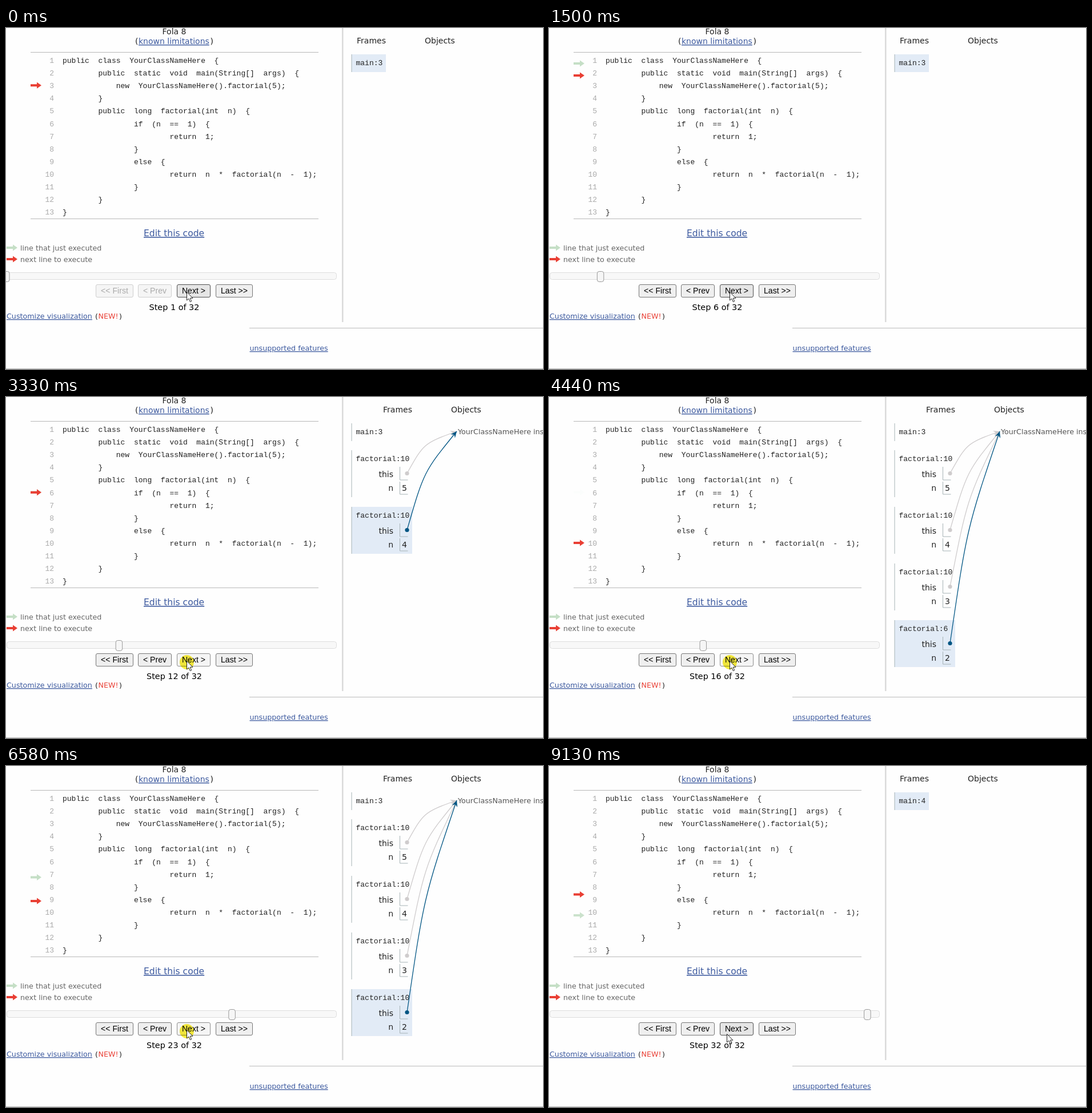
Animation of 940x596 px, one loop 9.2 s. Source, as an HTML page:

```html
<!DOCTYPE html>
<html lang="en">
<head>
<meta charset="utf-8">
<title>Stepping through a recursive factorial</title>
<style>
html, body { margin: 0; width: 100%; height: 100%; overflow: hidden; background: #fefefe; }
svg { display: block; }
text { font: 14px "DejaVu Sans", sans-serif; fill: #222; white-space: pre; }
.mono { font: 13.03px "Liberation Mono", monospace; }
.small { font-size: 12.7px; }
.link { fill: #3d5a9f; text-decoration: underline; }
.button { font: 14.1px "Liberation Sans", sans-serif; }
</style>
</head>
<body>
<svg width="940" height="596" viewBox="0 0 940 596"><g id="page"></g><g id="live"></g></svg>
<script>
const LOOP = 9200;
const RED = '#e93f34', GREEN = '#c5dfc6', BLUE = '#005583', GREY = '#cfcccd', EDGE = '#a6b3b6';
const CODE = `public class YourClassNameHere {
    public static void main(String[] args) {
      new YourClassNameHere().factorial(5);
    }
    public long factorial(int n) {
        if (n == 1) {
            return 1;
        }
        else {
            return n * factorial(n - 1);
        }
    }
}`.replace(/ /g, '  ').split('\n');

// Time of every click, and the line of code that runs next after it
const clicks = [0, 180, 460, 700, 940, 1172, 1660, 1950, 2240, 2530, 2820, 3110, 3410, 3690, 3970, 4250,
  4515, 4790, 5050, 5300, 5700, 5960, 6238, 6640, 6950, 7290, 7640, 7930, 8230, 8530, 8835, 9110];
const call = [6, 6, 10];
const lines = [3, 3, 1, 1, 1, 3, ...call, ...call, ...call, ...call, 6, 6, 7, 7, ...Array(8).fill(10), 3, 4];

const clamp = v => Math.max(0, Math.min(1, v));
const ease = v => v < .5 ? 4 * v ** 3 : 1 - 4 * (1 - v) ** 3;
const esc = s => String(s).replace(/</g, '&lt;').replace(/>/g, '&gt;');
const text = (x, y, s, cls = '', more = '') => `<text x="${x}" y="${y}" class="${cls}" ${more}>${esc(s)}</text>`;
const rect = (x, y, w, h, fill, more = '') => `<rect x="${x}" y="${y}" width="${w}" height="${h}" fill="${fill}" ${more}/>`;
const path = (d, more) => `<path d="${d}" ${more}/>`;
const END = 'text-anchor="end"', MID = 'text-anchor="middle"';
const marker = (x, y, fill) =>
  path(`M${x},${y - 2}h11v-3.5l8,5.5l-8,5.5v-3.5h-11z`, `fill="${fill}"`);

const isReturn = step => step === 5 || (step >= 22 && step <= 30 && step % 2 === 0);
const markerY = step => 56 + 22.1 * (lines[step - 1] - 1) + (isReturn(step) ? 6 : 0);

function depthAt(step) {
  if (step < 7 || step > 30) return 0;
  if (step < 19) return Math.floor((step - 7) / 3) + 1;
  return step < 23 ? 5 : 4 - ((step - 23) >> 1);
}

function drawPage() {
  return text(294.5, 11, 'Fola 8', '', MID) + text(226, 28, '(') + text(232, 28, 'known limitations', 'link') +
    text(357.5, 28, ')') +
    rect(43, 42, 504, 1, '#b8b8b8') + rect(43, 333, 504, 1, '#b8b8b8') +
    CODE.map((s, i) => text(84, 61 + 22.1 * i, i + 1, 'mono', END + ' style="fill:#aaa"') +
      text(99, 61 + 22.1 * i, s, 'mono')).join('') +
    text(241, 364, 'Edit this code', 'link', 'style="font-size:15.6px"') +
    marker(1, 384, GREEN) + text(25, 389, 'line that just executed', 'small', 'style="fill:#666"') +
    marker(1, 404, RED) + text(25, 409, 'next line to execute', 'small', 'style="fill:#666"') +
    rect(1.5, 427.5, 577, 12, '#f8f8f8', 'stroke="#ddd" rx="4"') +
    text(1, 508, 'Customize visualization', 'small link') + text(156, 508, '(', 'small') +
    text(161.5, 508, 'NEW!', 'small', `style="fill:${RED}"`) + text(198, 508, ')', 'small') +
    rect(588, 0, 2.5, 514, '#dadada') + rect(426, 524, 514, 1, '#bbb') + rect(0, 595, 940, 1, '#bbb') +
    text(426.5, 564, 'unsupported features', 'small link');
}

function drawButton(x, w, label, state = 'normal') {
  const [fill, stroke, ink] = {
    normal: ['#efefef', '#767676', '#000'], off: ['#f5f5f5', '#cfcfcf', '#aaa'],
    hover: ['#e5e5e5', '#4f4f4f', '#000'], down: ['#f5f5f5', '#8d8d8d', '#000']
  }[state];
  return rect(x + .5, 448.5, w - 1, 22, fill, `stroke="${stroke}" rx="2.5"`) +
    text(x + w / 2, 464, label, 'button', `${MID} style="fill:${ink}"`);
}

function drawPointer(x, y, endX, active) {
  const color = active ? BLUE : GREY, endY = 60;
  const cx = (x + endX) / 2 - 14, cy = (y + endY) / 2 - 16;
  const angle = Math.atan2(endY - cy, endX - cx) * 180 / Math.PI;
  return path(`M${x},${y}C${cx},${cy} ${cx},${cy} ${endX},${endY}`, `fill="none" stroke="${color}" stroke-width="1.3"`) +
    `<circle cx="${x}" cy="${y}" r="3.6" fill="${color}"/>` +
    path('M0,0L-11,-5L-7,0L-11,5z', `fill="${color}" transform="translate(${endX},${endY}) rotate(${angle})"`);
}

function drawFrame(top, right, title, n, active, result) {
  const wide = result === undefined ? 14 : result === 'void' ? 38 : 9 * String(result).length + 5;
  const cell = right - 8 - wide, height = (n ? 82 : 57) + (result === undefined ? 0 : 40);
  const box = (y, h) => path(`M${cell + .5},${y}v${h}h${wide}`, `fill="none" stroke="${EDGE}"`);
  const row = top + (n ? 54 : 29);
  let out = (active ? rect(605, top - 1, right - 605, height, '#e2ebf6') : '') +
    rect(604.5, top - 1, 1, height, EDGE) + text(612.5, top + 18, title, 'mono') +
    text(cell - 11, top + 46, 'this', '', END) + box(top + 28, 23);
  if (n) out += text(cell - 11, top + 70, 'n', '', END) + box(top + 54, 22) + text(cell + 4, top + 70, n);
  if (result !== undefined) {
    const red = `${END} style="fill:${RED}"`;
    out += text(cell - 11, row + 38, 'Return', '', red) + text(cell - 11, row + 55, 'value', '', red) +
      box(row + 25, 35) + text(cell + 4, row + 47, result);
  }
  return { out, dotX: cell + 13, dotY: top + 39.5 };
}

function drawStack(step) {
  const depth = depthAt(step), init = step >= 3 && step <= 5, alone = !depth && !init;
  const right = depth ? 711 : !init ? 665 : step === 5 ? 718 : 681;
  let out = text(right, 27, 'Frames', '', END) + text(right + 68, 27, 'Objects') +
    (alone ? rect(605, 46, 60, 31, '#e2ebf6') : '') + rect(604.5, 46, 1, 31, EDGE) +
    text(612.5, 65, 'main:' + (step === 32 ? 4 : 3), 'mono');
  if (alone) return out;
  out += text(right + 80, 65, 'YourClassNameHere instance', 'small', 'style="fill:#555"');
  const count = depth || 1;
  let pointers = '';
  for (let i = 0; i < count; i++) {
    const active = i === count - 1, n = init ? 0 : 5 - i;
    const title = init ? '<init>:1' : 'factorial:' + (active ? lines[step - 1] : 10);
    const result = active && isReturn(step) ? (init ? 'void' : [1, 2, 6, 24, 120][n - 1]) : undefined;
    const frame = drawFrame(94 + 99 * i, right, title, n, active, result);
    out += frame.out;
    pointers += drawPointer(frame.dotX, frame.dotY, right + 78, active);
  }
  return out + pointers;
}

// The green marker fades, then takes the red one's place; the red one moves on after it
function drawMarkers(t, step) {
  const moved = Math.max(1, clicks.filter(c => c + 200 <= t).length);
  const fade = step > moved ? clamp((t - clicks[step - 1]) / 200) : 0;
  let out = '', y = markerY(1);
  if (moved > 1) {
    const from = markerY(moved - 1);
    out = `<g opacity="${1 - fade}">${marker(43, from, GREEN)}</g>`;
    y = from + (markerY(moved) - from) * ease(clamp((t - clicks[moved - 1] - 200) / 250));
  }
  return out + marker(43, y, RED);
}

function drawMouse(t, down) {
  const a = clamp((t - 6700) / 900), b = clamp((t - 8100) / 600);
  const x = 316.5 - 3 * a - 2 * b, y = 461.5 + 5 * a + 2 * b;
  return (down ? `<circle cx="${x}" cy="${y + 2}" r="12.5" fill="#f9ee3c" style="mix-blend-mode:multiply"/>` : '') +
    path(`M${x},${y}v14.5l3.4,-3l2.4,5.6l2.4,-1l-2.4,-5.4h4.6z`, 'fill="#fff" stroke="#222"');
}

function drawLive(t) {
  const step = Math.max(1, clicks.filter(c => c <= t).length);
  const down = step < 32 && t >= clicks[step] - 110;
  const back = step === 1 ? 'off' : 'normal';
  return drawMarkers(t, step) + drawStack(step) +
    rect(-5.5 + 17.97 * (step - 1), 425.5, 11.5, 18, '#f6f6f6', 'stroke="#999" rx="3.5"') +
    drawButton(157, 66, '<< First', back) + drawButton(231, 59, '< Prev', back) +
    drawButton(299, 59, 'Next >', down ? 'down' : 'hover') + drawButton(367, 65, 'Last >>') +
    text(294.5, 493, `Step ${step} of 32`, '', MID + ' style="font-size:14.4px;fill:#000"') +
    drawMouse(t, down);
}

const live = document.getElementById('live');
document.getElementById('page').innerHTML = drawPage();
const start = performance.now();
function tick() {
  live.innerHTML = drawLive((performance.now() - start) % LOOP);
  requestAnimationFrame(tick);
}
tick();
</script>
</body>
</html>
```
